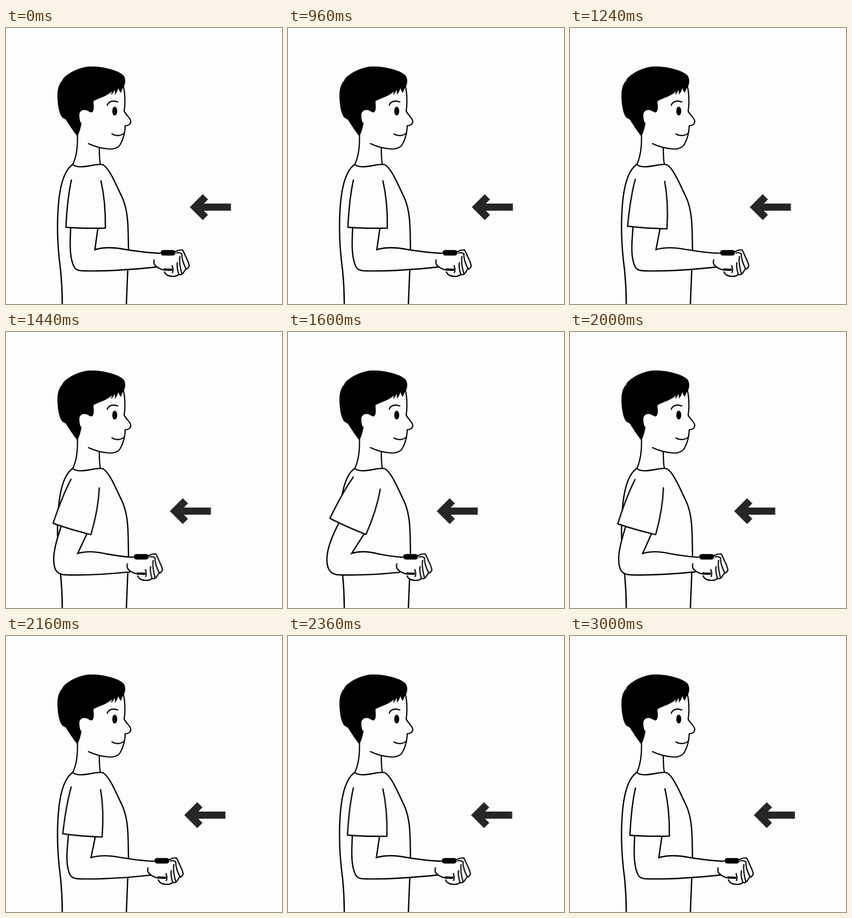
Recreate the animation shown at these times as an HTML page. Size 500 by 500 pixels, loop 4 s.

```html
<!DOCTYPE html>
<html lang="en">
<head>
<meta charset="utf-8">
<title>Arm pull</title>
<style>
  :root { --paper: #fdfdfd; }
  html, body { margin: 0; width: 100%; height: 100%; overflow: hidden; background: var(--paper); }
  svg { display: block; width: 100vw; height: 100vh; }
  path { stroke-linecap: round; stroke-linejoin: round; }
  .line { fill: none; stroke: #000; stroke-width: 2.2; }
  .bold { stroke-width: 2.4; }
  .skin { fill: var(--paper); }
  .arm, .sleeve { fill: var(--paper); stroke: #000; stroke-width: 2.4; }
  .arm { stroke-linejoin: miter; }

  .arrow, .arm, .sleeve, .hand { animation: 4s linear infinite; }
  .arrow { fill: #262626; animation-name: arrow; }
  .arm { animation-name: arm; }
  .hand { animation-name: hand; }
  .sleeve { animation-name: sleeve; transform-origin: 150.1px 268.9px; }

  /* pull from 920 ms to 1720 ms, release until 2520 ms */
  @keyframes arrow {
    0%, 23%, 63%, 100% { transform: translateX(0); animation-timing-function: cubic-bezier(.876, 0, .49, 1); }
    43% { transform: translateX(-66.3px); animation-timing-function: cubic-bezier(.51, 0, .124, 1); }
  }
  @keyframes hand {
    0%, 23%, 63%, 100% { transform: translateX(0); animation-timing-function: cubic-bezier(.9, 0, .4, 1); }
    43% { transform: translateX(-73.4px); animation-timing-function: cubic-bezier(.585, 0, .1, 1); }
  }
  @keyframes sleeve {
    0%, 23%, 63%, 100% { transform: rotate(0deg); animation-timing-function: cubic-bezier(.9, 0, .4, 1); }
    43% { transform: rotate(23.5deg); animation-timing-function: cubic-bezier(.585, 0, .1, 1); }
  }
  @keyframes arm {
    0%, 23%, 63%, 100% {
      d: path("M117.5 355 C115.5 392 115.5 412 121 427 C124 437 128 440 142 440 C185 441 225 438 272 433 L281 408 C260 408 240 405 215 401 C195 397 177 397 161 401.5 L167.5 355");
      animation-timing-function: cubic-bezier(.9, 0, .4, 1);
    }
    43% {
      d: path("M94 341 C81 364 69 392 69 412 C69 430 76 440 92 440 C125 441 165 439 200 435.5 L208 408 C192 408 178 405 162 402 C147 398 130 396 114 401 L141 360");
      animation-timing-function: cubic-bezier(.585, 0, .1, 1);
    }
  }
</style>
</head>
<body>
<svg viewBox="0 0 500 500">
  <!-- face and neck -->
  <g class="line">
    <path d="M213 107 C216 120 216 140 214 150 C217 158 226 163 226 169 C226 174 222 177 216 177 C216 187 213 201 207 211 C203 218 193 220 185 219 C172 218 160 214.5 149.5 209.5"/>
    <path d="M192 192 C199 196.5 208 195.5 214.5 190.5"/>
    <path d="M183.5 140 C186 132 195 131 202.5 134"/>
    <path d="M129.5 194 C130 215 127 235 121 247"/>
    <path d="M169 217 C169 230 169 238 171 247"/>
  </g>
  <ellipse cx="197" cy="150.5" rx="4.5" ry="8"/>
  <path d="M129 196 C121 186 115 176 109 167 C107 164 104 165 101 161 C96 154 93 138 93.2 120 C93.5 108 97 100 102 95 L103 92 C115 79 135 71 150 69.8 C175 68.5 205 77 213 86 C218 93 216.5 104 211 110 L208 117.5 Q205 114 203.5 109 Q202 115 197.5 121 L197 111.500 Q195 117 190.5 121.500 L191.500 115 C183 124 170 126 158.5 132.5 L159 143 C159 150 157 153 154.5 153 C150 152 148 148.5 142 148.5 C136 148.5 132 153 133 160 C133 167 135 171 137 173 C135 180 134 189 129 196 Z"/>

  <!-- torso -->
  <g class="line bold">
    <path d="M121 247 C105 258 96 290 94 335 C92 370 95 410 99 440 C101 460 102 480 102 502"/>
    <path d="M121 247 C127 254 145 251 155 249 C165 247 172 246 176 248 C187 254 199 283 211 308 C223 335 221 370 222 403 C221 435 219 470 218 502"/>
  </g>

  <path class="arm" d="M117.5 355 C115.5 392 115.5 412 121 427 C124 437 128 440 142 440 C185 441 225 438 272 433 L281 408 C260 408 240 405 215 401 C195 397 177 397 161 401.5 L167.5 355"/>
  <path class="sleeve" d="M118.5 275.5 C113 300 110 332 108.5 361 C132 363 158 363 180 362.5 C180.5 330 178 303 172 277"/>

  <g class="hand">
    <path class="skin" d="M281 407 L307 405 L320 402 Q323 408 326 415 Q331 425 332 431 Q330 436 325 437 Q323 441 320 445 L313 447 Q310 450 303 450 Q290 450 287 441 L275 434 C270 431 266 427 268 419 Z"/>
    <g class="line">
      <path d="M268.5 420 C266.5 427 269 430 275 434 C279 436.5 283 438 287 438.5"/>
      <path d="M306 405.5 L313 402.5 L320 402 Q323 408 326 415 Q331 425 332 431 Q330 436 326 437"/>
      <path d="M309 407.5 Q314 406 318.5 409 C318 420 323 430 326 436 Q323 441 320 445 Q317 448 313.5 446.5"/>
      <path d="M315 414 C313.5 424 316 436 318.5 445"/>
      <path d="M310.5 425 C309 432 311 440 313 446 Q310 450 303 450 Q290 450 287 442"/>
      <path d="M301 430.5 C303 436 303 440 301.5 443"/>
    </g>
    <rect x="280" y="402.2" width="27" height="10" rx="4.8"/>
    <path d="M286 435.5 L301 436 Q302 440 299 440 L287 439.5 Q284 437 286 435.5 Z"/>
  </g>

  <path class="arrow" d="M333 324.5 L356.5 301 L366 310.5 L358.5 318 H407.5 V331 H358.5 L366 338.5 L356.5 348 Z"/>
</svg>
</body>
</html>
```
